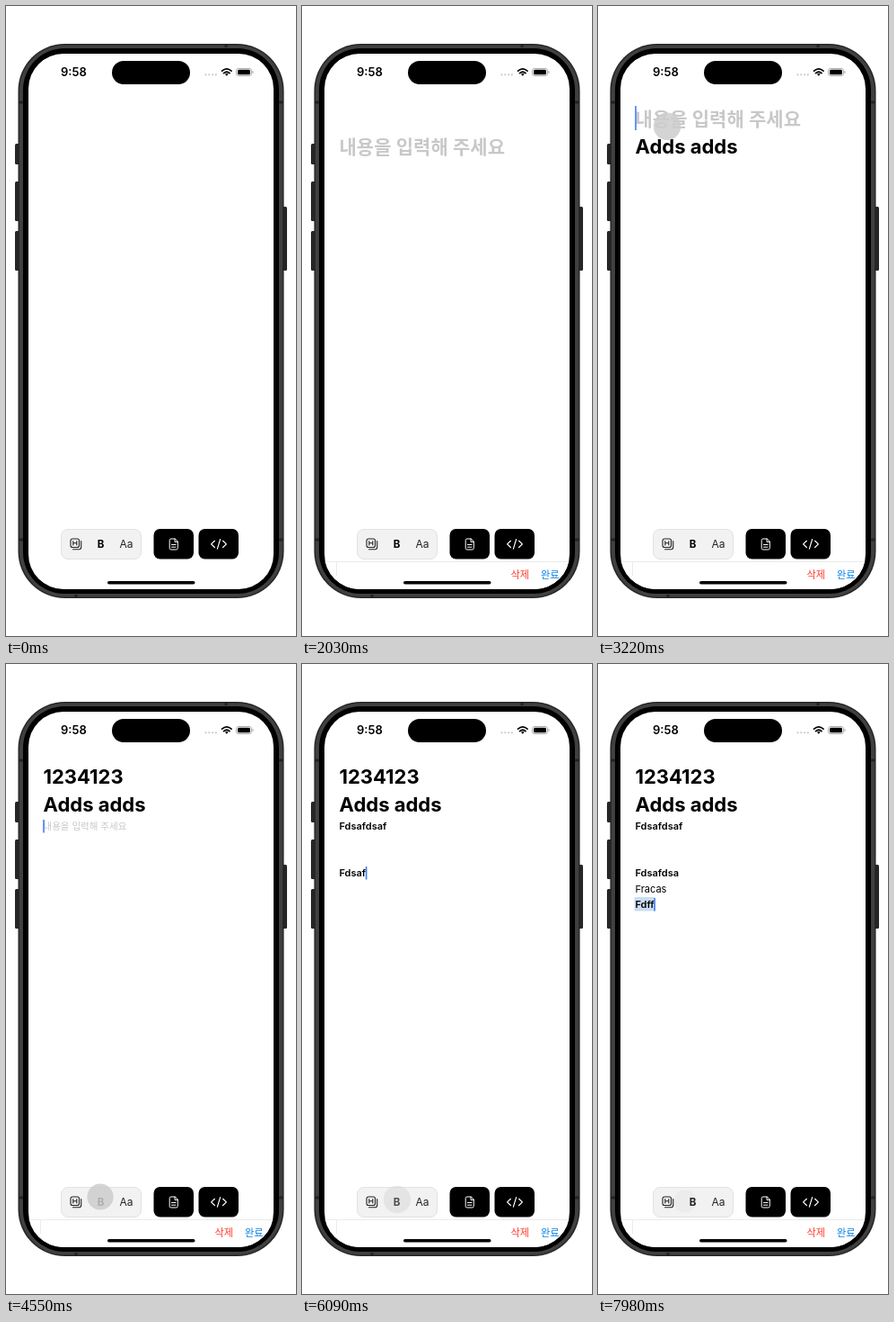
Recreate the animation shown at these times as an HTML page. Size 323 px wide and 700 px high, loop 8 s.

```html
<!DOCTYPE html>
<html lang="ko">
<head>
<meta charset="utf-8">
<title>Note editor</title>
<style>
  html, body { margin: 0; height: 100%; overflow: hidden; background: #fff; }
  svg { display: block; width: 323px; height: 700px; }
  text { font-family: Inter, "Noto Sans CJK KR", "Noto Sans CJK", sans-serif; white-space: pre; }
  .line { fill: none; stroke-linecap: round; stroke-linejoin: round; }
</style>
</head>
<body>
<svg viewBox="0 0 323 700">
  <clipPath id="screen"><rect x="25" y="53" width="273" height="595" rx="39"/></clipPath>

  <!-- Phone body -->
  <g fill="#262626">
    <rect x="10" y="153" width="8" height="23" rx="1.5"/>
    <rect x="10" y="195" width="8" height="44" rx="1.5"/>
    <rect x="10" y="250" width="8" height="44" rx="1.5"/>
    <rect x="305" y="223" width="8" height="71" rx="1.5"/>
    <rect x="13.5" y="42" width="296" height="616" rx="52"/>
  </g>
  <rect x="15" y="43.5" width="293" height="613" rx="50.5" fill="#404040"/>
  <path d="M245 42v4M14 107h5M304 107h5M14 593h5M304 593h5M78 654v4" stroke="#222" stroke-width="3"/>
  <rect x="19" y="47" width="285" height="606" rx="46"/>
  <rect x="25" y="53" width="273" height="595" rx="39" fill="#fff"/>

  <!-- Status bar -->
  <text x="61" y="78" font-size="13" font-weight="600">9:58</text>
  <rect x="118" y="61" width="87" height="26" rx="13"/>
  <path d="M222.5 76.3h12" class="line" stroke="#c4c4c4" stroke-width="2" stroke-dasharray="0 3.8"/>
  <g class="line" stroke="#000" stroke-width="1.8" stroke-linecap="butt">
    <path d="M240.6 72.2q5.2-4.6 10.4 0M242.6 74.6q3.2-2.8 6.4 0"/>
  </g>
  <path d="M243.9 75.7q1.9-1.6 3.8 0l-1.9 2z"/>
  <rect x="256.5" y="69.5" width="17" height="8" rx="2.5" fill="none" stroke="#aaa"/>
  <rect x="258" y="70.7" width="14" height="5.6" rx="1.5"/>
  <path d="M275 72v3" stroke="#aaa"/>

  <g id="rows"></g>
  <rect id="caret" width="1.6" fill="#3f7df5"/>

  <!-- Format bar -->
  <rect x="61.5" y="581.5" width="89" height="33" rx="7.5" fill="#f2f2f2" stroke="#e2e2e2"/>
  <g class="line" stroke="#222" stroke-width="1.1">
    <rect x="72" y="592" width="9.5" height="9.5" rx="2"/>
    <path d="M74.8 594.6v4.4M78.8 594.6v4.4M74.8 596.8h4M83.7 594.5v7a2.2 2.2 0 0 1-2.2 2.2h-7"/>
  </g>
  <text x="105.5" y="602" font-size="11.5" font-weight="700" text-anchor="middle">B</text>
  <text x="134" y="602" font-size="12" fill="#222" text-anchor="middle">Aa</text>
  <rect x="164.5" y="581" width="44.5" height="33.5" rx="7"/>
  <rect x="214.5" y="581" width="44.5" height="33.5" rx="7"/>
  <g class="line" stroke="#fff">
    <path d="M188 592h-4.2q-1.6 0-1.6 1.6v8.8q0 1.6 1.6 1.6h5.9q1.6 0 1.6-1.6v-7zv3.4h3.3M184.5 598.5h4.5M184.5 601.2h4.5"/>
    <path d="M232.4 594.3l-3.8 3.6 3.8 3.6M241.6 594.3l3.8 3.6-3.8 3.6M238.6 592.6l-3.2 10.6" stroke-width="1.2"/>
  </g>

  <!-- Input accessory bar -->
  <g clip-path="url(#screen)">
    <g id="bar">
      <rect x="25" y="617" width="273" height="40" fill="#fff"/>
      <path d="M25 617.5h273M38.5 618v15" stroke="#ebebeb"/>
      <g font-size="11.2" font-weight="500">
        <text x="232.5" y="636" fill="#ff3b30">삭제</text>
        <text x="266" y="636" fill="#0a84e8">완료</text>
      </g>
    </g>
  </g>
  <rect x="113" y="639" width="97.5" height="3.6" rx="1.8"/>

  <circle id="touch" fill="#ccc"/>
</svg>
<script>
const LOOP = 8000, LEFT = 41.5, HINT = "내용을 입력해 주세요";
const $ = id => document.getElementById(id);
const clamp = v => Math.max(0, Math.min(1, v));

// keys: [start, characters, ms per character]; focus: spans when the caret is here
const rows = [
  { y: 133, size: 22, bold: true, focus: [2940, 4130],
    keys: [[3360, "123", 70], [3780, "4123", 70]] },
  { y: 164, size: 22, bold: true, focus: [1120, 2940],
    keys: [[2100, "Ad", 1], [2240, "d", 70], [2380, "s adds", 70]] },
  { y: 184, size: 11, bold: true, focus: [4130, 5530],
    keys: [[4830, "Fdsaf", 70], [5250, "dsaf", 70]] },
  { y: 201.5, size: 11, focus: [5530, 5600], keys: [] },
  { y: 219, size: 11, focus: [5600, 5670], keys: [] },
  { y: 236, size: 11, bold: true, focus: [5670, 6510], keys: [[5800, "Fdsafdsa", 70]] },
  { y: 254, size: 11, focus: [6510, 7420], keys: [[6790, "Fdsfas", 70]], fix: "Fracas" },
  { y: 271, size: 11, bold: true, focus: [7420, LOOP], keys: [[7560, "Fdff", 70]], select: 7910 },
];
const hinted = new Set([rows[0], rows[1], rows[2]]);

// [x, y at press, y at release, press, release]
const touches = [
  [77, 594, 597, 490, 910],
  [77, 118, 134, 2900, 3225],
  [90, 187, 187, 3990, 4200],
  [105, 592, 592, 4330, 4640],
  [106, 595, 595, 5630, 5975],
  [106.5, 597, 597, 7100, 7350],
  [97, 597, 597, 7960, 8300],
];

function add(name, attrs) {
  const el = document.createElementNS("http://www.w3.org/2000/svg", name);
  for (const key in attrs) el.setAttribute(key, attrs[key]);
  return $("rows").appendChild(el);
}
function set(el, attrs) {
  for (const key in attrs) el.setAttribute(key, attrs[key]);
}

for (const row of rows) {
  row.mark = add("rect", { x: 40.5, y: row.y - 12, height: 15.5, fill: "#cbdcf2" });
  row.text = add("text", { x: LEFT, y: row.y, "font-size": row.size });
}

function typed(row, t) {
  if (row.fix && t >= row.focus[1]) return row.fix;
  return row.keys.map(([start, chars, step]) =>
    chars.slice(0, Math.max(0, Math.floor((t - start) / step) + 1))).join("");
}

function drawRow(row, t) {
  const [from, to] = row.focus, focused = t >= from && t < to;
  const value = typed(row, t), large = row.size > 20;
  const hint = focused && !value && hinted.has(row);
  row.text.textContent = hint ? HINT : value;
  set(row.text, {
    fill: hint ? "#c8c8c8" : "#000",
    "font-size": hint ? row.size * .955 : row.size,
    "font-weight": hint ? (large ? 600 : 400) : row.bold ? (large ? 700 : 600) : 400,
  });
  const width = value ? row.text.getComputedTextLength() : 0;
  row.mark.setAttribute("width", row.select <= t ? width + 1.5 : 0);
  if (!focused) return;

  // The caret stays solid after each edit, then blinks
  const edits = row.keys.flatMap(([start, chars, step]) => [start, start + (chars.length - 1) * step]);
  const last = Math.max(from, ...edits.filter(e => e <= t));
  set($("caret"), {
    x: LEFT + width - .3,
    y: row.y - (large ? 22 : 11),
    height: large ? 27 : 14.5,
    opacity: (t - last) % 1000 < 600 ? 1 : 0,
  });
}

function drawTouch(t) {
  const touch = touches.find(([, , , down, up]) => t >= down && t < up + 210);
  $("touch").setAttribute("opacity", 0);
  if (!touch) return;
  const [x, y0, y1, down, up] = touch;
  const age = t - down;
  set($("touch"), {
    cx: x,
    cy: y0 + (y1 - y0) * clamp(age / (up - down)),
    r: 12.5 + 2.7 * clamp((age - 80) / 180),
    opacity: .85 * clamp(age / 110) * clamp(1 - (t - up) / 210),
  });
}

function draw(t) {
  $("caret").setAttribute("opacity", 0);
  rows.forEach(row => drawRow(row, t));
  const rise = 1 - (1 - clamp((t - 1050) / 450)) ** 3;
  set($("bar"), {
    transform: `translate(0 ${(1 - rise) * 32})`,
    visibility: t < 1050 ? "hidden" : "visible",
  });
  drawTouch(t);
}

const begin = performance.now();
function tick() {
  draw((performance.now() - begin) % LOOP);
  requestAnimationFrame(tick);
}
tick();
</script>
</body>
</html>
```
